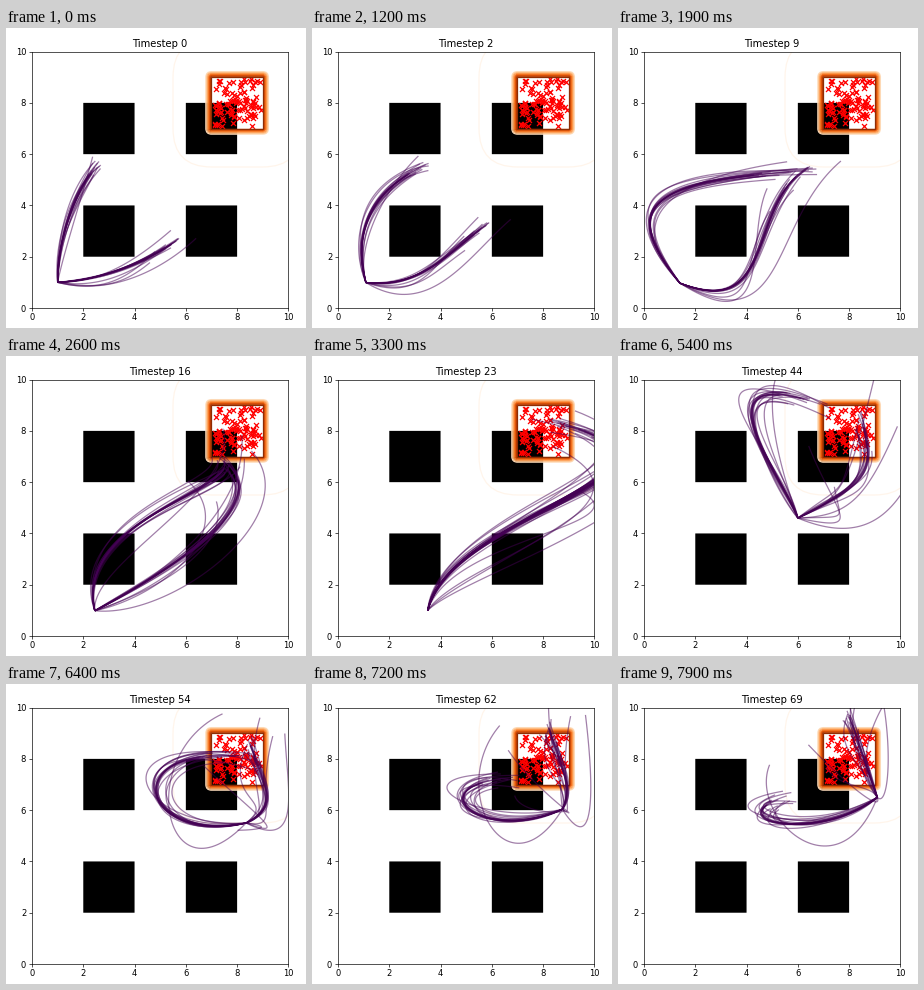
These frames come from a looping animation (300 px wide and 300 px high, 8 s). A matplotlib script:

```python
import numpy as np
import matplotlib.pyplot as plt
from matplotlib.animation import FuncAnimation
from matplotlib.collections import LineCollection
from matplotlib.patches import FancyBboxPatch, Rectangle

SIZE = 300
HOLD = 10          # extra frames on the first timestep
STEPS = 70
SAMPLES = 20       # plans per route

# Every plan is a cubic Bezier curve. Its handles glide between a few
# key positions, given as {timestep: (x, y)}.
VEHICLE = {0: (1, 1), 9: (1.4, .97), 23: (3.5, 1), 33: (4.7, 2.6),
           44: (6, 4.6), 54: (8.35, 5.5), 69: (9.1, 6.5)}
RIGHT = [
    {0: (2.8, 1.1), 9: (5.2, -.5), 23: (4.4, 5), 33: (6.5, 5.3), 54: (9.8, 6.2), 69: (8.7, 7.6)},
    {0: (4.5, 1.8), 9: (4, 4), 23: (16, 6.5), 33: (9.8, 5.2), 69: (8.4, 8.8)},
    {0: (5.7, 2.7), 9: (6.4, 5.5), 23: (8.2, 8.4), 54: (8.4, 8.8), 69: (7.9, 9.9)},
]
LEFT = [
    {0: (1, 2.8), 9: (-1.2, 4.2), 23: (4.4, 5), 33: (6.9, 5), 44: (5.5, 6), 54: (4.2, 4.6), 69: (6.6, 4.6)},
    {0: (1.7, 4.6), 9: (.5, 5), 23: (16, 6.5), 33: (3, 6.8), 44: (1.6, 11), 54: (3.1, 8.7), 69: (2.6, 5.7)},
    {0: (2.6, 5.7), 9: (6.7, 5.4), 23: (8.2, 8.4), 33: (5.6, 9.9), 54: (8.5, 8.1), 69: (5.7, 6.6)},
]

s = np.linspace(0, 1, 70)[:, None]
BEZIER = np.hstack([(1 - s)**3, 3 * s * (1 - s)**2, 3 * s**2 * (1 - s), s**3])


def glide(keys, step):
    return [np.interp(step, list(keys), axis) for axis in zip(*keys.values())]


def make_noise(rng):
    """Handle offsets: most plans stay in the bundle, a few stray far."""
    tail = np.clip(rng.standard_t(1.6, (SAMPLES, 1, 1)), -6, 6)
    noise = tail * rng.normal(size=(SAMPLES, 4, 2))
    return noise * np.array([0, .5, 1, .7])[:, None]


rng = np.random.default_rng(8)
ROUTES = [(route, make_noise(rng)) for route in (LEFT, RIGHT)]
LENGTHS = rng.integers(60, 71, SAMPLES)


def plans(step):
    """All sampled curves for one timestep."""
    jitter = np.random.default_rng(100 + step)
    spread = .1 + .2 * min(1, step / 33)
    curves = []
    for route, noise in ROUTES:
        handles = np.array([glide(keys, step) for keys in (VEHICLE, *route)])
        wobble = 1 + .3 * jitter.normal(size=noise.shape)
        for h, n in zip(handles + spread * noise * wobble, LENGTHS):
            curves.append((BEZIER @ h)[:n])
    return curves


fig = plt.figure(figsize=(5, 5), dpi=60, facecolor="white")
ax = fig.add_axes([26 / SIZE, 20 / SIZE, 256.4 / SIZE, 256.4 / SIZE])
ticks = range(0, 11, 2)
ax.set(xlim=(0, 10), ylim=(0, 10), xticks=ticks, yticks=ticks)
ax.tick_params(axis="x", pad=2.6)
title = ax.set_title("Timestep 0", pad=5)

for x in (2, 6):
    for y in (2, 6):
        ax.add_patch(Rectangle((x, y), 2, 2, facecolor="black", edgecolor="none", snap=False))

goal = rng.uniform(7.05, 8.95, (100, 2))
ax.scatter(*goal.T, marker="x", color="red", s=36, linewidths=1.5, zorder=1.2)


def contour(dist, shade):
    style = f"round,pad={dist},rounding_size={dist}" if dist else "square,pad=0"
    ax.add_patch(FancyBboxPatch((7, 7), 2, 2, boxstyle=style, fill=False, lw=1.5,
                                edgecolor=plt.cm.Oranges(shade), zorder=1.5))


contour(1.5, 0.0)
for d in np.linspace(.22, 0, 7):
    contour(d, .95 - 3.5 * d)

lines = LineCollection([], colors=[plt.cm.viridis(0.0)], linewidths=1.5, alpha=.5, zorder=2)
ax.add_collection(lines, autolim=False)


def draw(frame):
    step = max(0, frame - HOLD)
    title.set_text(f"Timestep {step}")
    lines.set_segments(plans(step))
    return title, lines


anim = FuncAnimation(fig, draw, frames=STEPS + HOLD, interval=100, repeat=True, repeat_delay=0)
plt.show()
```
